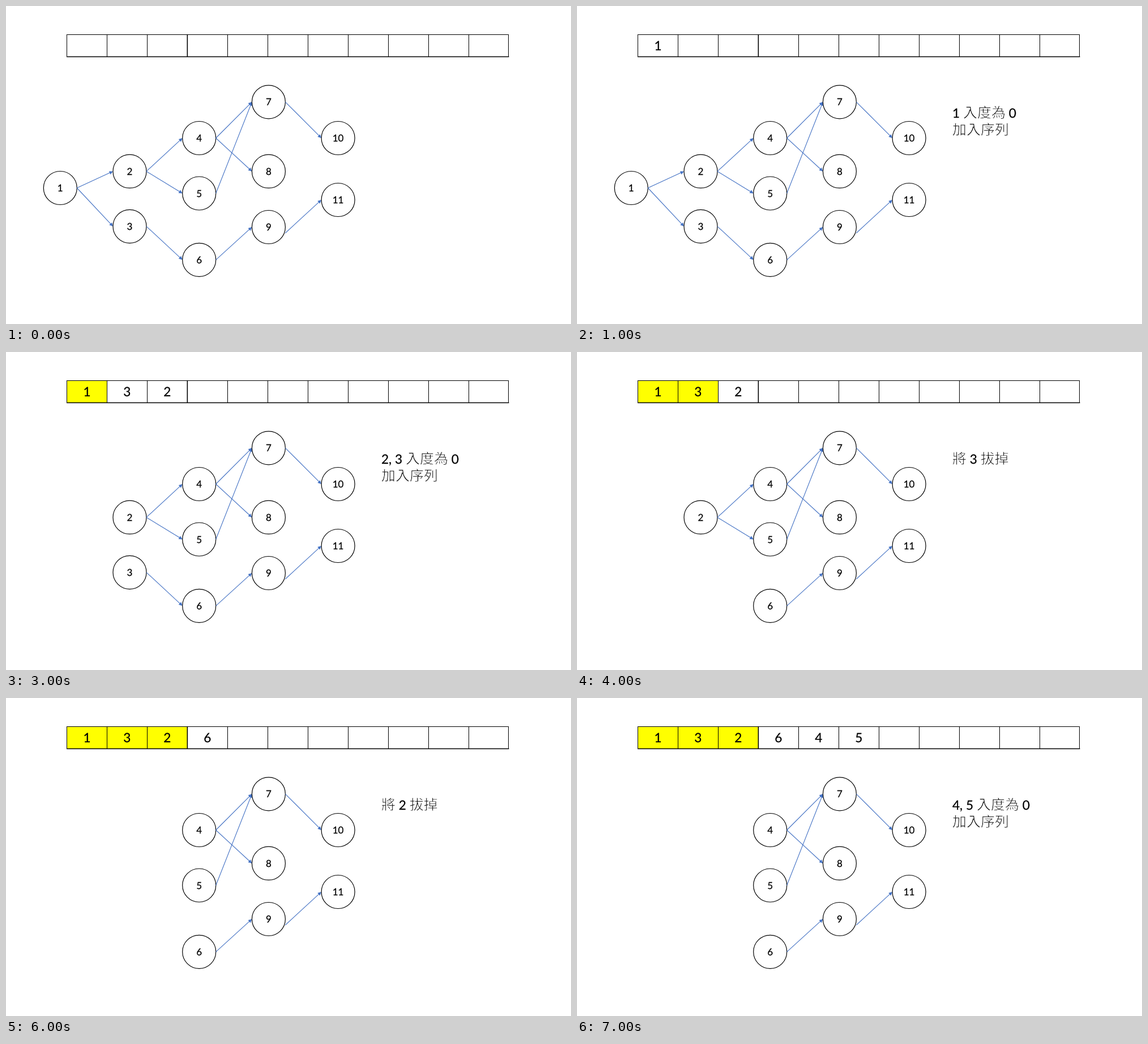
An HTML page for the animation above (8 s loop, 998x561 px).

```html
<!DOCTYPE html>
<html lang="zh-Hant">
<head>
<meta charset="utf-8">
<title>Topological sort</title>
<style>
@property --step { syntax: "<number>"; inherits: true; initial-value: 0; }
@keyframes run { from { --step: 0; } to { --step: 8; } }
html, body { margin: 0; width: 100%; height: 100%; overflow: hidden; background: #fff; }
svg { display: block; width: 998px; height: 561px; animation: run 8s steps(8, end) infinite; }
/* visible while from <= step < to */
.timed { opacity: clamp(0, min(var(--step) - var(--from) + 1, var(--to) - var(--step)), 1); }
text {
  font: 22.6px Lato, "Noto Sans CJK TC", "Noto Sans CJK", sans-serif;
  stroke: #000; stroke-width: .25; text-rendering: geometricPrecision; white-space: pre;
}
.mid { text-anchor: middle; }
.label { font-size: 17px; }
/* the white outline thins the strokes */
.han { font: 300 25px "Noto Sans CJK TC", "Noto Sans CJK", sans-serif; stroke: #fff; stroke-width: .8; }
.node { fill: #fff; stroke: #000; stroke-width: 1.2; }
.edge { stroke: #4472c4; stroke-width: 1.1; }
.tip { fill: #4472c4; }
.grid { fill: none; stroke: #000; shape-rendering: crispEdges; }
.bold { stroke-width: 1.6; shape-rendering: auto; }
</style>
</head>
<body>
<svg id="stage" viewBox="0 0 998 561"></svg>
<script>
const stage = document.getElementById('stage');
const END = 8, R = 29.5;
const LEFT = 107.5, TOP = 50.5, BOTTOM = 89.5, CELL = 70.95, COUNT = 11;

function add(parent, tag, attrs, text) {
  const el = document.createElementNS('http://www.w3.org/2000/svg', tag);
  for (const key in attrs) el.setAttribute(key, attrs[key]);
  if (text !== undefined) el.textContent = text;
  parent.append(el);
  return el;
}

const timed = (from, to = END) =>
  add(stage, 'g', { class: 'timed', style: `--from:${from};--to:${to}` });

// Node heights by column, numbered in reading order
const columns = [[321], [291.7, 388.8], [233, 330.5, 447.8], [169.3, 291.7, 390], [233, 342]];
const nodes = columns.flatMap((ys, col) => ys.map(y => ({ x: 95.8 + 122.7 * col, y, degree: 0 })));
nodes.unshift(null);
const next = { 1: [3, 2], 2: [4, 5], 3: [6], 4: [7, 8], 5: [7], 6: [9], 7: [10], 9: [11] };
const startDrop = { 9: 10.5 };
for (const id of Object.values(next).flat()) nodes[id].degree++;

// Sort: free nodes join on odd steps, the queue's next one is pulled on even steps
const queue = [], captions = [];
let free = [1];
for (let step = 1; step < END; step += 2) {
  for (const id of free) {
    nodes[id].joined = step;
    queue.push(id);
  }
  captions.push([free.sort((a, b) => a - b).join(', ') + ' 入度為 0', '加入序列']);
  const id = queue[(step - 1) / 2];
  nodes[id].pulled = step + 1;
  captions.push([`將 ${id} 拔掉`]);
  free = (next[id] || []).filter(to => --nodes[to].degree === 0);
}

// Queue strip
queue.forEach((id, i) => {
  const x = LEFT + i * CELL, { joined, pulled = END } = nodes[id];
  add(timed(pulled), 'rect', { x, y: TOP, width: CELL, height: BOTTOM - TOP, fill: '#ff0' });
  add(timed(joined), 'text', { class: 'mid', x: x + CELL / 2, y: 78 }, id);
});
const across = `H${LEFT + COUNT * CELL + .5}`;
let lines = `M${LEFT - .5} ${TOP}${across}`;
for (let i = 0; i <= COUNT; i++) lines += `M${LEFT + i * CELL} ${TOP}V${BOTTOM}`;
add(stage, 'path', { class: 'grid', d: lines });
add(stage, 'path', {
  class: 'grid bold',
  d: `M${LEFT - .5} ${BOTTOM}${across}M${LEFT + 3 * CELL} ${TOP}V${BOTTOM}`
});

// Graph
function drawEdge(group, x1, y1, x2, y2) {
  const angle = Math.atan2(y2 - y1, x2 - x1);
  add(group, 'line', {
    class: 'edge', x1, y1, x2: x2 - 4 * Math.cos(angle), y2: y2 - 4 * Math.sin(angle)
  });
  add(group, 'path', {
    class: 'tip', d: 'M0 0L-6.4 -3.2V3.2Z',
    transform: `translate(${x2} ${y2}) rotate(${angle * 180 / Math.PI})`
  });
}

nodes.forEach((node, id) => {
  if (!node) return;
  const { x, y, pulled } = node, group = timed(0, pulled);
  add(group, 'circle', { class: 'node', cx: x, cy: y, r: R });
  add(group, 'text', { class: 'mid label', x, y: y + 6 }, id);
  for (const to of next[id] || []) {
    drawEdge(group, x + R, y + (startDrop[id] || 0), nodes[to].x - R, nodes[to].y);
  }
});

// One caption per step, from step 1
captions.forEach((rows, i) => {
  const group = timed(i + 1, i + 2);
  rows.forEach((row, n) => {
    const line = add(group, 'text', { x: 663, y: 196.5 + 30 * n });
    for (const run of row.match(/[\u4e00-\u9fff]+|[^\u4e00-\u9fff]+/g)) {
      add(line, 'tspan', run >= '\u4e00' ? { class: 'han' } : {}, run);
    }
  });
});
</script>
</body>
</html>
```
